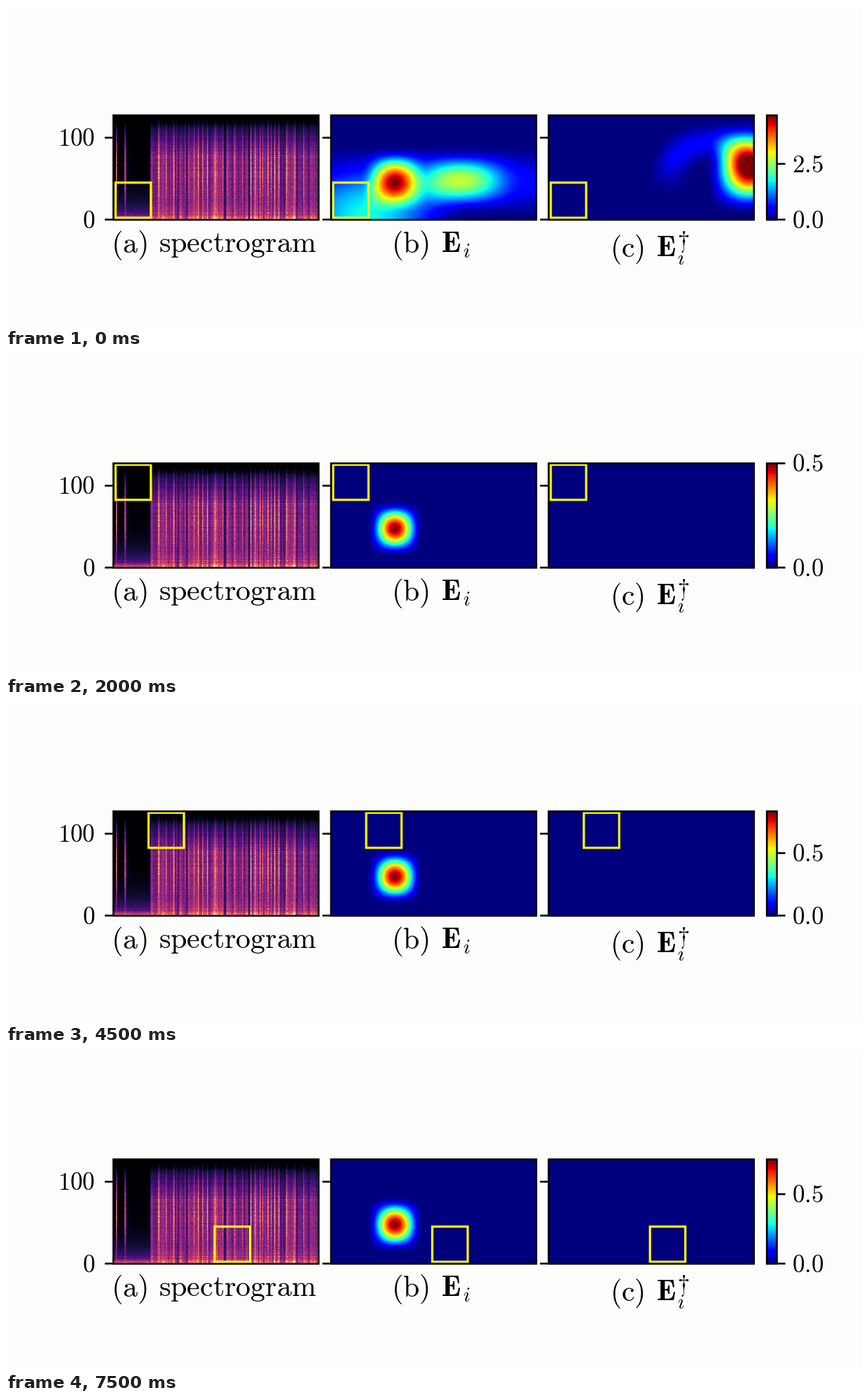
Write a matplotlib script that moves like this. It is 1222 px wide and 458 px high and loops after 8 s.

```python
import numpy as np
import matplotlib.pyplot as plt
from matplotlib.animation import FuncAnimation
from matplotlib.patches import Rectangle

W, H, DPI = 1222, 458, 100
PT = 72 / DPI                        # points per pixel
LEFTS = 153.3 + 310.7 * np.arange(3)  # left edges of the three panels
TOP, BOTTOM, PANEL_W = 156.5, 306, 293
PANEL_H = BOTTOM - TOP
BAR_X, BAR_W = 1086.2, 14.3
COLS, BINS = 250, 128
STEP, ROWS, COUNT = 47.2, 5, 16      # window stride, positions per column, in all
LINE = 2.6
BIG, SMALL, DIGITS = 42, 29.4, 35    # text sizes in pixels

plt.rcParams.update({"mathtext.fontset": "cm", "path.snap": False})
fig = plt.figure(figsize=(W / DPI, H / DPI), dpi=DPI, facecolor="#fdfdfc")
ax = fig.add_axes([0, 0, 1, 1])
ax.axis("off")


def label(x, y, tex, size, ha="left"):
    return ax.text(x, y, f"${tex}$", fontsize=size * PT, ha=ha,
                   va="baseline", color="black", zorder=6)


def outline(x, y, w, h, color, lw, z):
    box = Rectangle((x, y), w, h, fill=False, ec=color, lw=lw * PT,
                    joinstyle="miter", zorder=z)
    return ax.add_patch(box)


def tick(x, y):
    return ax.plot([x, x + 12], [y, y], color="black", lw=LINE * PT,
                   solid_capstyle="butt", zorder=5)[0]


def picture(data, x, w, cmap, interp="bilinear"):
    return ax.imshow(data, extent=(x, x + w, BOTTOM, TOP), cmap=cmap, vmin=0,
                     vmax=1, interpolation=interp, aspect="auto", zorder=1)


def hann(d, w):
    return np.where(np.abs(d) < w, .5 + .5 * np.cos(np.pi * d / w), 0)


def spectrogram():
    rng = np.random.default_rng(4)
    f = np.arange(BINS)
    cutoff = np.clip((124 - f) / 14, 0, 1)
    loud = (.3 * np.exp(-f / 7) + .38 * np.clip((128 - f) / 50, 0, 1)) * cutoff
    quiet = .4 * np.exp(-f / 3) + .3 * np.exp(-f / 20)
    click = .75 * hann(f - 62, 75) * cutoff
    spike = (.12 + .22 * hann(f - 60, 70)) * cutoff

    texture = np.convolve(rng.normal(0, 1, COLS + 2), [.25, .5, .25], "valid")
    img = loud[:, None] * (.9 + .3 * texture)
    first = 45
    img[:, :first] = quiet[:, None]
    for c in first + np.cumsum(rng.integers(4, 11, 26)):
        if c + 1 < COLS:
            img[:, c] += spike * rng.uniform(.6, 1.3)
            img[:, c + 1] += spike * .5
    for c, power in ((3, 1), (14, .7)):
        img[:, c] += click * power
        img[:, c + 1] += click * power * .5

    streaks = 1 + rng.normal(0, .05, (BINS, 1))
    grain = rng.normal(0, .08, img.shape) * img
    return np.clip(img * streaks + grain, 0, 1)[::-1]


GX, GY = np.meshgrid((np.arange(COLS) + .5) / COLS * PANEL_W,
                     (np.arange(BINS) + .5) / BINS * PANEL_H)


def bump(x, y, wx, wy):
    return hann(GX - x, wx) * hann(GY - y, wy)


CORE = bump(91.3, 93.5, 40, 40)
LOBE = bump(184, 93.5, 60, 42) + .3 * bump(138, 94, 36, 36)
HALO = (.75 * bump(91.3, 93.5, 50, 48) + .38 * bump(186, 93, 85, 46)
        + .22 * bump(146, 95, 300, 56) + .38 * bump(50, 150, 150, 75))
ARC = .12 * hann(np.hypot(GX - 230, GY - 95) - 58, 36) * hann(GY - 50, 70)

# top of the colour scale, passing through a few levels
PEAK = np.interp(np.arange(COUNT), [0, 2, 3, 4, 5, 7, 9, 12, 13, 15],
                 [4.67, 1.05, .45, .5, 2.56, 3.06, .833, 1.58, .9, .75])


def fields(peak):
    """Both heat maps: the stronger the response, the wider it spreads."""
    extra = max(peak - 1.6, 0)
    halo = np.clip((peak - 3.2) / 1.4, 0, 1)
    b = (1 - halo) * (CORE + .28 * extra * LOBE) + halo * HALO
    size = 42 + 4.3 * peak
    blob = bump(286, 62 + 2.6 * peak, size, size + 6)
    return b, min(extra / .9, 1.03) * blob + halo * ARC


def scale_tick(peak):
    if peak >= 4:
        return 2.5, ".1f"
    if peak >= 1:
        return min(int(peak), 2), ".0f"
    return (.5, ".1f") if peak >= .5 else (.25, ".2f")


picture(spectrogram(), LEFTS[0], PANEL_W, "magma", "nearest")
heat = [picture(CORE, x, PANEL_W, "jet") for x in LEFTS[1:]]
picture(np.linspace(1, 0, 256)[:, None], BAR_X, BAR_W, "jet")

boxes = []
for left in LEFTS:
    outline(left, TOP, PANEL_W, PANEL_H, "black", LINE, 5)
    for y in (188.5, 305.7):
        tick(left - 12.3, y)
    box = outline(left, TOP, 50.5, 50.3, "#ffff00", 3.2, 3)
    box.set_clip_path(Rectangle((left, TOP), PANEL_W, PANEL_H, transform=ax.transData))
    boxes.append(box)
outline(BAR_X, TOP, BAR_W, PANEL_H, "black", LINE, 5)

label(126.8, 200.3, "100", DIGITS, "right")
label(126.8, 317.5, "0", DIGITS, "right")

for name, x, y in (("a", 150, 352.5), ("b", 550.5, 352.5), ("c", 862, 358.5)):
    label(x, y, rf"\mathrm{{({name})}}", BIG)
label(217.5, 352.5, r"\mathrm{spectrogram}", BIG)
for x, y, sub in ((621, 352.5, 360), (927.5, 358.5, 370.5)):
    label(x, y, r"\mathbf{E}", BIG)
    label(x + 31, sub, "i", SMALL)
label(958, 345, r"\dagger", 35)

tick(BAR_X + BAR_W, 305.7)
mark = tick(BAR_X + BAR_W, TOP)
zero = label(1121.8, 317.5, "0", DIGITS)
value_text = label(1121.8, TOP, "1", DIGITS)

ax.set_xlim(0, W)
ax.set_ylim(H, 0)


def update(n):
    peak = PEAK[n]
    for im, data in zip(heat, fields(peak)):
        im.set_data(np.clip(data, 0, 1))
    col, row = divmod(n, ROWS)
    for box, left in zip(boxes, LEFTS):
        box.set_xy((left + 3 + col * STEP, 252.8 - row * STEP / 2))
    value, fmt = scale_tick(peak)
    y = BOTTOM - PANEL_H * value / peak
    mark.set_ydata([y, y])
    value_text.set_y(y + 12)
    value_text.set_text(f"${value:{fmt}}$")
    zero.set_text(f"${0:{fmt}}$")
    return [*heat, *boxes, mark, value_text, zero]


anim = FuncAnimation(fig, update, frames=COUNT, interval=500, repeat=True,
                     repeat_delay=0, init_func=lambda: update(0))
plt.show()
```
